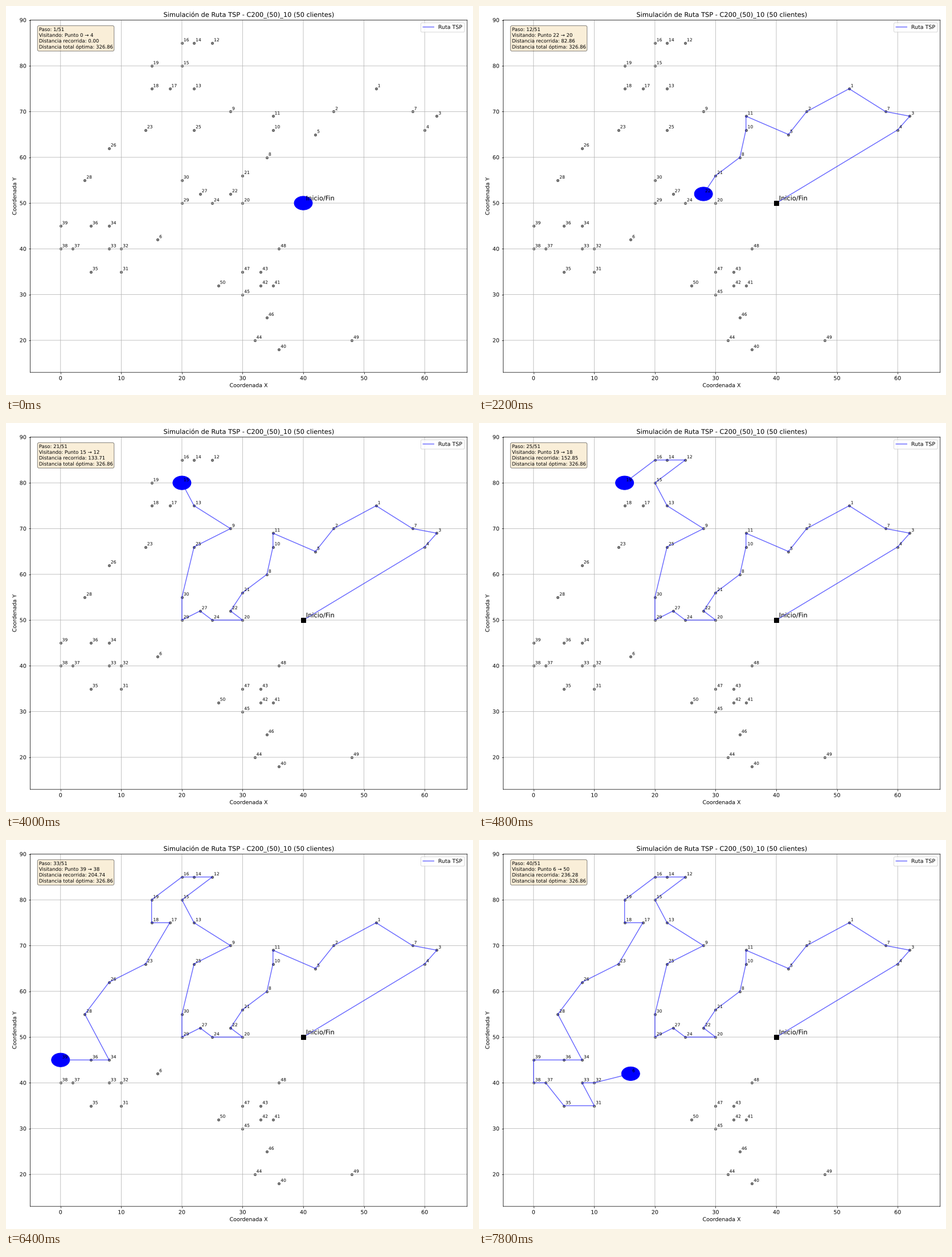
A matplotlib script for the animation above (8000 ms loop, 820x683 px).

```python
import numpy as np
import matplotlib.pyplot as plt
from matplotlib.animation import FuncAnimation
from matplotlib.patches import Circle
from matplotlib.patheffects import Normal
from matplotlib.text import Text

W, H = 820, 683
DPI = W / 12
VISITS, STEPS, OPTIMAL = 40, 51, 326.86

# Depot first, then the clients in order of their labels.
POINTS = np.array([
    (40, 50), (52, 75), (45, 70), (62, 69), (60, 66), (42, 65), (16, 42),
    (58, 70), (34, 60), (28, 70), (35, 66), (35, 69), (25, 85), (22, 75),
    (22, 85), (20, 80), (20, 85), (18, 75), (15, 75), (15, 80), (30, 50),
    (30, 56), (28, 52), (14, 66), (25, 50), (22, 66), (8, 62), (23, 52),
    (4, 55), (20, 50), (20, 55), (10, 35), (10, 40), (8, 40), (8, 45),
    (5, 35), (5, 45), (2, 40), (0, 40), (0, 45), (36, 18), (35, 32),
    (33, 32), (33, 35), (32, 20), (30, 30), (34, 25), (30, 35), (36, 40),
    (48, 20), (26, 32),
])
# Stops where the tour does not go on to the nearest client.
DETOURS = {0: 4, 5: 11, 13: 15, 15: 12, 28: 34, 31: 33}


def build_route():
    route, free = [0], set(range(1, len(POINTS)))
    while len(route) <= VISITS:
        here = route[-1]
        nearest = min(sorted(free),
                      key=lambda k: np.hypot(*(POINTS[k] - POINTS[here])))
        route.append(DETOURS.get(here, nearest))
        free.remove(route[-1])
    return route


route = build_route()
path = POINTS[route]
legs = np.hypot(*np.diff(path, axis=0).T)
travelled = np.concatenate([[0], np.cumsum(legs)])

plt.rcParams.update({"font.family": "DejaVu Sans", "path.snap": False,
                     "text.hinting": "none"})
fig = plt.figure(figsize=((W + 1e-4) / DPI, (H + 1e-4) / DPI), dpi=DPI)
left, right, top, bottom = 42.5, 809.75, 24.8, 643.2
ax = fig.add_axes([left / W, 1 - bottom / H,
                   (right - left) / W, (bottom - top) / H])
ax.set_xlim(-5, 67)
ax.set_ylim(13, 90)
ax.set_title("Simulación de Ruta TSP - C200_(50)_10 (50 clientes)")
ax.set_xlabel("Coordenada X")
ax.set_ylabel("Coordenada Y")
ax.grid(True)


def label(text, xy, size, gap):
    ax.annotate(text, xy, xytext=(gap, gap), textcoords="offset points",
                fontsize=size)


ax.scatter(*POINTS[1:].T, s=20, c="black", alpha=0.5)
for i, xy in enumerate(POINTS[1:], 1):
    label(str(i), xy, 8, 3)
label("Inicio/Fin", POINTS[0], 12, 5)

line, = ax.plot([], [], "b-", lw=1.5, alpha=0.6, label="Ruta TSP")
ax.plot(*POINTS[0], "ks", ms=8)
vehicle = ax.add_patch(Circle(POINTS[0], 1.5, color="blue", zorder=2.5))
info = ax.text(0.02, 0.98, "", transform=ax.transAxes, va="top", fontsize=9,
               bbox=dict(boxstyle="round", facecolor="wheat", alpha=0.5))
ax.legend(loc="upper right")

# Draw glyphs as smooth outlines rather than pixel-fitted ones.
for text in fig.findobj(Text):
    text.set_path_effects([Normal()])


def update(i):
    line.set_data(*path[:i + 1].T)
    vehicle.center = tuple(path[i])
    info.set_text(f"Paso: {i + 1}/{STEPS}\n"
                  f"Visitando: Punto {route[i]} → {route[i + 1]}\n"
                  f"Distancia recorrida: {travelled[i]:.2f}\n"
                  f"Distancia total óptima: {OPTIMAL:.2f}")
    return line, vehicle, info


anim = FuncAnimation(fig, update, frames=VISITS, interval=200,
                     init_func=lambda: update(0), repeat=True, repeat_delay=0)
plt.show()
```
